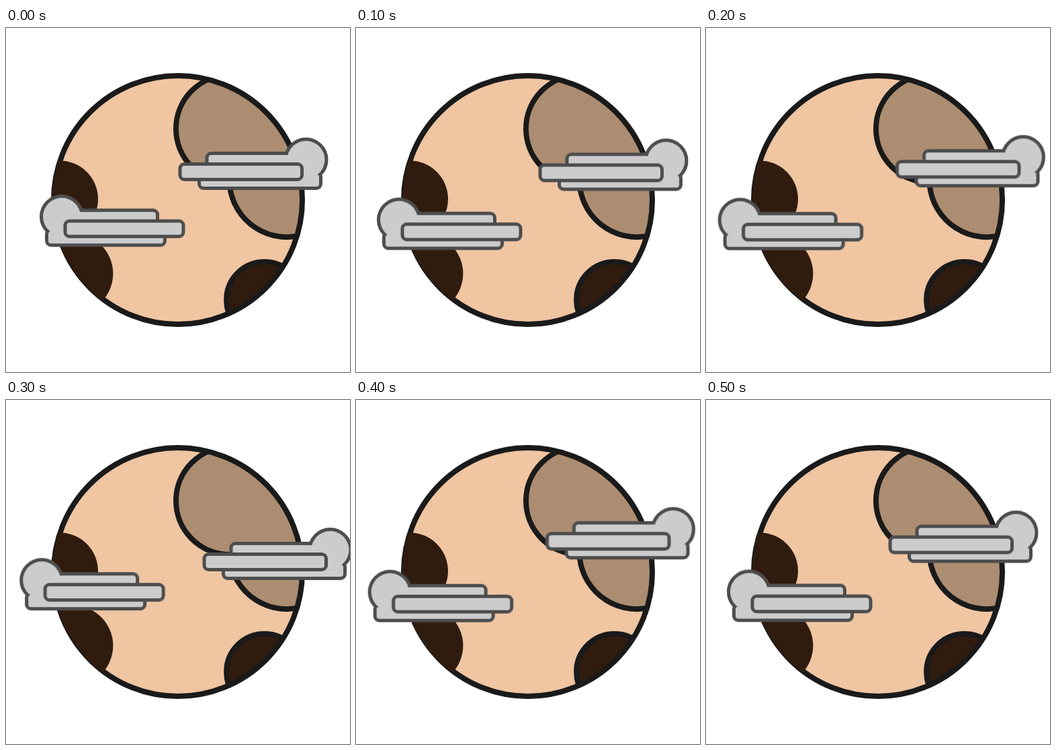
An HTML page without scripts that plays this animation: 512 px wide and 512 px high, repeating every 0.6 s.

```html
<!DOCTYPE html>
<html lang="en">
<head>
<meta charset="utf-8">
<title>Planet with drifting clouds</title>
<style>
  html, body { margin: 0; width: 100%; height: 100%; overflow: hidden; background: #fff; }
  svg { display: block; width: 100%; height: 100%; }

  .line { fill: none; stroke: #1a1a1a; stroke-width: 8; }
  .dark { fill: #301c0e; }
  .tan { fill: #ad8d71; }
  .rim { fill: #4d4d4d; stroke: #4d4d4d; stroke-width: 10; }
  .puff { fill: #ccc; }
  .bar { fill: #ccc; stroke: #4d4d4d; stroke-width: 10; paint-order: stroke; }

  .east, .west { animation: east .6s step-end infinite; }
  .west { animation-name: west; }

  @keyframes east {
    0% { transform: translate(0, 0); }
    16.667%, 83.333% { transform: translate(15px, 1.5px); }
    33.333%, 66.667% { transform: translate(25.5px, -3.7px); }
    50% { transform: translate(36px, 27px); }
  }
  @keyframes west {
    0% { transform: translate(0, 0); }
    16.667%, 83.333% { transform: translate(-19px, 4.7px); }
    33.333%, 66.667% { transform: translate(-32.3px, 5px); }
    50% { transform: translate(-29.8px, -12.5px); }
  }
</style>
</head>
<body>
<svg viewBox="0 0 512 512">
  <defs>
    <clipPath id="disc"><circle cx="256" cy="256" r="185"/></clipPath>
    <clipPath id="edge"><circle cx="256" cy="256" r="187"/></clipPath>
    <!-- Cloud bodies, centred on the round head -->
    <g id="long">
      <circle r="28"/>
      <rect x="-145" y="-7" width="145" height="20" rx="4"/>
      <rect x="-156.5" y="22" width="176" height="18" rx="4"/>
    </g>
    <g id="short">
      <circle r="28"/>
      <rect x="-140" y="-7" width="140" height="20" rx="4"/>
      <rect x="-151" y="22" width="171" height="18" rx="4"/>
    </g>
  </defs>

  <circle cx="256" cy="256" r="185" fill="#efc5a2"/>
  <g clip-path="url(#disc)">
    <g class="tan">
      <circle cx="333" cy="150" r="80"/>
      <circle cx="418.5" cy="225" r="86"/>
    </g>
    <path class="line" d="M333 70A80 80 0 0 0 333 230V236A86 86 0 0 0 445 307"/>
    <circle class="dark" cx="384.7" cy="404.7" r="56.6"/>
    <circle class="line" cx="384.7" cy="404.7" r="56.6"/>
  </g>
  <circle class="line" cx="256" cy="256" r="185"/>
  <g class="dark" clip-path="url(#edge)">
    <circle cx="80" cy="254.5" r="57"/>
    <circle cx="100" cy="365.5" r="59.4"/>
  </g>

  <g class="east">
    <g transform="translate(446.5 196)">
      <use href="#long" class="rim"/>
      <use href="#long" class="puff"/>
      <rect class="bar" x="-185" y="9" width="176.5" height="18" rx="4"/>
    </g>
  </g>
  <g class="west">
    <g transform="translate(83 280.7) scale(-1 1)">
      <use href="#short" class="rim"/>
      <use href="#short" class="puff"/>
      <rect class="bar" x="-178.5" y="9" width="171" height="18" rx="4"/>
    </g>
  </g>
</svg>
</body>
</html>
```
